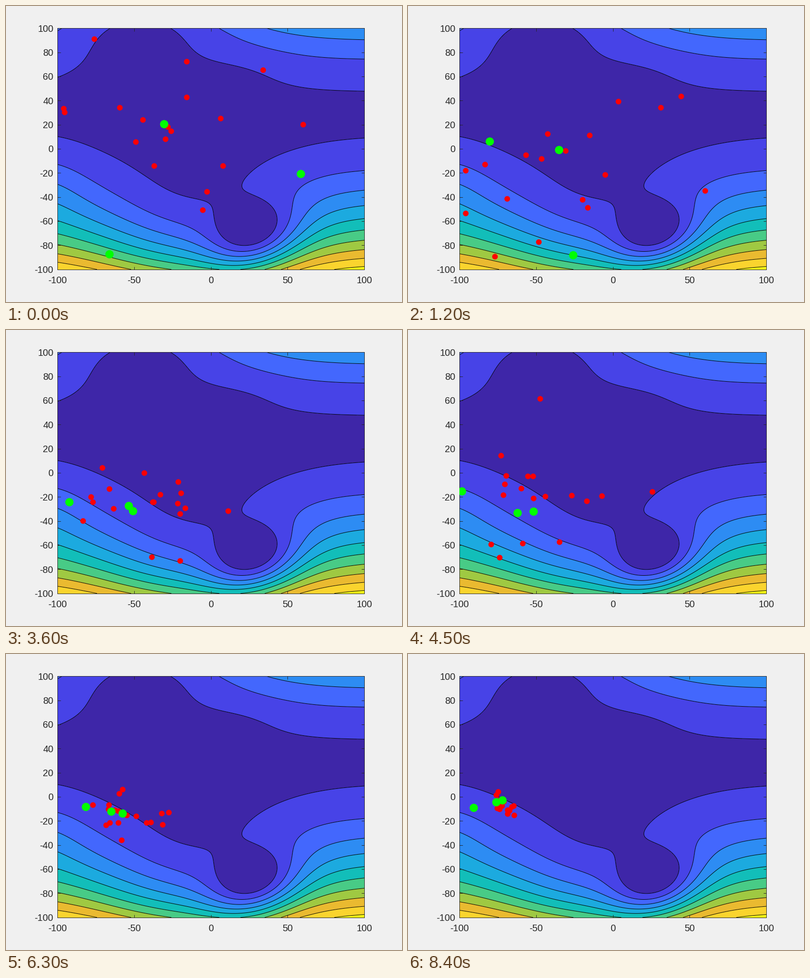
Animation of 840 by 630 pixels, one loop 8.7 s. Source, as a matplotlib script:

```python
import numpy as np
import matplotlib.pyplot as plt
from matplotlib.animation import FuncAnimation

W, H, DPI = 840, 630, 100
PX = 72 / DPI
FRAMES, STEP_MS = 29, 300
MEMBERS = 18
INK = "#262626"
BANDS = ["#3e26a8", "#4743e7", "#4367fd", "#2d8cf3", "#1caadf", "#12beb9",
         "#48cb86", "#9fc942", "#eaba30", "#fad42e", "#f9fb15"]

# Key generations and the places of the three leaders in each.
KEYS = [0, 4, 8, 12, 18, 24, 28]
LEADERS = np.array([
    [(-30.6, 20.8), (58.6, -20.7), (-66.4, -87.3)],
    [(-80.4, 6.4), (-35.2, -0.8), (-26, -88)],
    [(-39.8, -17.5), (-54, -21.4), (-45.2, -36.6)],
    [(-92.4, -24.1), (-53.7, -27.3), (-50.8, -31.4)],
    [(-89.8, -9.2), (-67, -15.8), (-65.3, -24.7)],
    [(-74, -11.1), (-62.1, -8), (-53.8, -6.2)],
    [(-90.7, -8.8), (-76.2, -4.3), (-72, -2.9)],
])


def bump(x, y, x0, y0, sx, sy, tilt=0):
    dx, dy = x - x0, y - y0
    return np.exp(-(dx / sx)**2 / 2 - (dy / sy)**2 / 2 + tilt * dx * dy)


def cost(x, y):
    """Trough along y = 29 with three hollows and two small corrections."""
    trough = 0.8 + (y - 29)**2 / 1690
    return (trough
            - 4.0 * bump(x, y, -12, -82, 49, 45)
            - 4.0 * bump(x, y, 28, -74, 20, 19, 0.0006)
            - 3.65 * bump(x, y, -46, 120, 50, 32)
            - 0.27 * bump(x, y, 22, 66, 22, 12)
            + 0.65 * bump(x, y, -108, -32, 18, 22))


def leaders(k, rng):
    """Travel between key places, with a random hop on the way."""
    i = min(np.searchsorted(KEYS, k, side="right") - 1, len(KEYS) - 2)
    u = (k - KEYS[i]) / (KEYS[i + 1] - KEYS[i])
    hop = rng.normal(0, 14 * (1 - k / FRAMES), (3, 2)) * np.sin(np.pi * u)
    return LEADERS[i] + (LEADERS[i + 1] - LEADERS[i]) * u + hop


def members(k, rng):
    """A fresh cloud each generation that drifts west and tightens."""
    u = k / (FRAMES - 1)
    centre = -22 - 52 * u, np.interp(k, [0, 4, 12, 28], [27, -15, -22, -7])
    spread = 44 * (1 - u) + 7, 34 * (1 - u)**1.5 + 8
    cloud = rng.laplace(centre, np.array(spread) / np.sqrt(2), (MEMBERS, 2))
    return np.clip(cloud, (-96, -92), (60, 91))


fig = plt.figure(figsize=(W / DPI, H / DPI), dpi=DPI, facecolor="#f0f0f0")
ax = fig.add_axes([0.13, 0.11, 0.775, 0.815])


def draw_surface():
    side = np.linspace(-100, 100, 401)
    x, y = np.meshgrid(side, side)
    z = cost(x, y)
    steps = np.arange(1, len(BANDS))
    ax.contourf(x, y, z, levels=[-99, *steps, 99], colors=BANDS)
    ax.contour(x, y, z, levels=steps, colors="black", linewidths=PX)


def draw_axes():
    xs, ys = range(-100, 101, 50), range(-100, 101, 20)
    ax.set(xlim=(-100, 100), ylim=(-100, 100), xticks=xs, yticks=ys)
    ax.set_axisbelow(False)
    ax.tick_params(direction="in", top=True, right=True, length=6.5 * PX,
                   width=PX, color=INK, labelbottom=False, labelleft=False)
    for spine in ax.spines.values():
        spine.set(color=INK, linewidth=PX)
    text = dict(family="Liberation Sans", size=20 * PX, color=INK,
                va="baseline")
    for v in xs:
        ax.text(v, -111.4, str(v), ha="center", **text)
    for v in ys:
        ax.text(-102.7, v - 2.9, str(v), ha="right", **text)


def dots(color, size, z):
    return ax.plot([], [], "o", color=color, ms=size * PX, mew=0, zorder=z)[0]


draw_surface()
draw_axes()
red = dots("#ff0000", 12, 4)
green = dots("#00ff00", 17.6, 5)


def update(k):
    rng = np.random.default_rng(50 + k)
    green.set_data(*leaders(k, rng).T)
    red.set_data(*members(k, rng).T)
    return red, green


anim = FuncAnimation(fig, update, frames=FRAMES, interval=STEP_MS, repeat=True)
plt.show()
```
